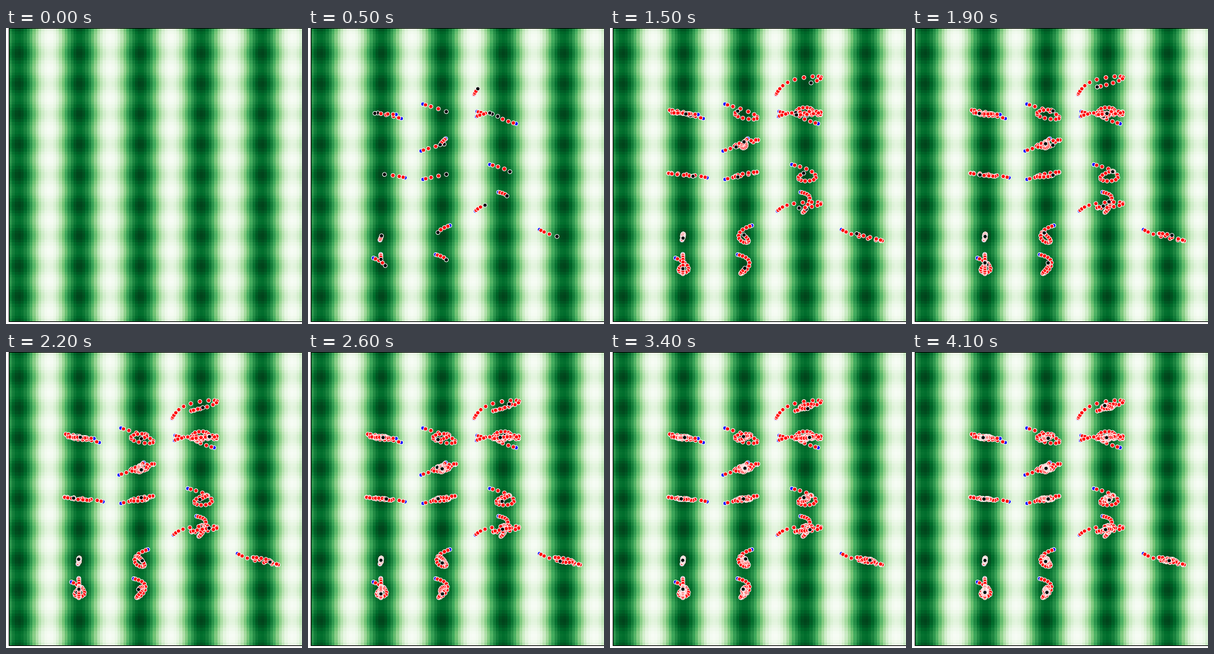
An HTML page with a canvas that plays this animation: 438x438 px, repeating every 4200 ms.

```html
<!DOCTYPE html>
<html>
<head>
<meta charset="utf-8">
<title>Momentum descent</title>
<style>
  html, body { margin: 0; width: 100%; height: 100%; overflow: hidden; background: #fff; }
  canvas { display: block; }
</style>
</head>
<body>
<canvas id="stage" width="438" height="438"></canvas>
<script>
const ctx = document.getElementById('stage').getContext('2d');

// Axes span -15..15 in both directions.
const LEFT = 4.5, TOP = 0.5, SIZE = 434, SCALE = SIZE / 30;
const CELLS = 100, RIPPLE = 0.3, RATE = 0.3, MOMENTUM = 0.9;
const FRAME = 100, FRAMES = 42;

const height = (x, y) => Math.sin(x) + RIPPLE * Math.sin(y) ** 2;
const slope = (x, y) => [Math.cos(x), RIPPLE * Math.sin(2 * y)];

const GREENS = ['00441b', '006d2c', '238b45', '41ab5d', '74c476', 'a1d99b', 'c7e9c0', 'e5f5e0', 'f7fcf5']
  .map(hex => [0, 2, 4].map(i => parseInt(hex.slice(i, i + 2), 16)));

function green(level) {
  const p = Math.min(Math.max(level, 0), 1) * 8, i = Math.min(7, Math.floor(p));
  return `rgb(${GREENS[i].map((c, k) => Math.round(c + (GREENS[i + 1][k] - c) * (p - i)))})`;
}

function drawField() {
  const canvas = document.createElement('canvas');
  canvas.width = canvas.height = 438;
  const c = canvas.getContext('2d');
  c.fillStyle = '#fff';
  c.fillRect(0, 0, 438, 438);
  const value = i => -15 + 30 * i / (CELLS - 1);
  const edge = (start, i) => Math.round(start + SIZE * i / CELLS);
  for (let i = 0; i < CELLS; i++) {
    for (let j = 0; j < CELLS; j++) {
      const x = edge(LEFT, i), y = edge(TOP, j);
      c.fillStyle = green((height(value(i), value(j)) + 1) / (2 + RIPPLE));
      c.fillRect(x, y, edge(LEFT, i + 1) - x, edge(TOP, j + 1) - y);
    }
  }
  c.strokeRect(LEFT, TOP, SIZE, SIZE);
  return canvas;
}

// Starting points in stage pixels.
const STARTS = [
  [245.6, 98.8], [138, 134], [130.3, 128], [170, 112.6], [308, 141.6],
  [250.3, 123.6], [249.4, 131], [167.3, 182], [203.8, 163.8], [143.5, 221.5],
  [170.2, 224], [269, 202], [282, 243], [247.8, 270.9], [209.8, 292.3],
  [189, 335.3], [97, 340.4], [107.7, 335], [106.5, 313.8], [342.6, 298.2]
];

function descend([px, py]) {
  let x = (px - LEFT) / SCALE - 15, y = (py - TOP) / SCALE - 15, vx = 0, vy = 0;
  const path = [];
  for (let n = 0; n < FRAMES - 1; n++) {
    path.push([LEFT + (x + 15) * SCALE, TOP + (y + 15) * SCALE]);
    const [gx, gy] = slope(x, y);
    x += vx = MOMENTUM * vx - RATE * gx;
    y += vy = MOMENTUM * vy - RATE * gy;
  }
  return path;
}

const field = drawField();
const paths = STARTS.map(descend);

function dot([x, y], color) {
  ctx.beginPath();
  ctx.arc(x, y, 3, 0, 2 * Math.PI);
  ctx.fillStyle = color;
  ctx.fill();
  ctx.stroke();
}

function draw() {
  const count = Math.floor(performance.now() / FRAME) % FRAMES;
  ctx.drawImage(field, 0, 0);
  ctx.strokeStyle = '#fff';
  for (const path of paths) {
    path.slice(0, count).forEach((point, n) =>
      dot(point, n === count - 1 ? '#000' : n ? '#f00' : '#00f'));
  }
  requestAnimationFrame(draw);
}
draw();
</script>
</body>
</html>
```
